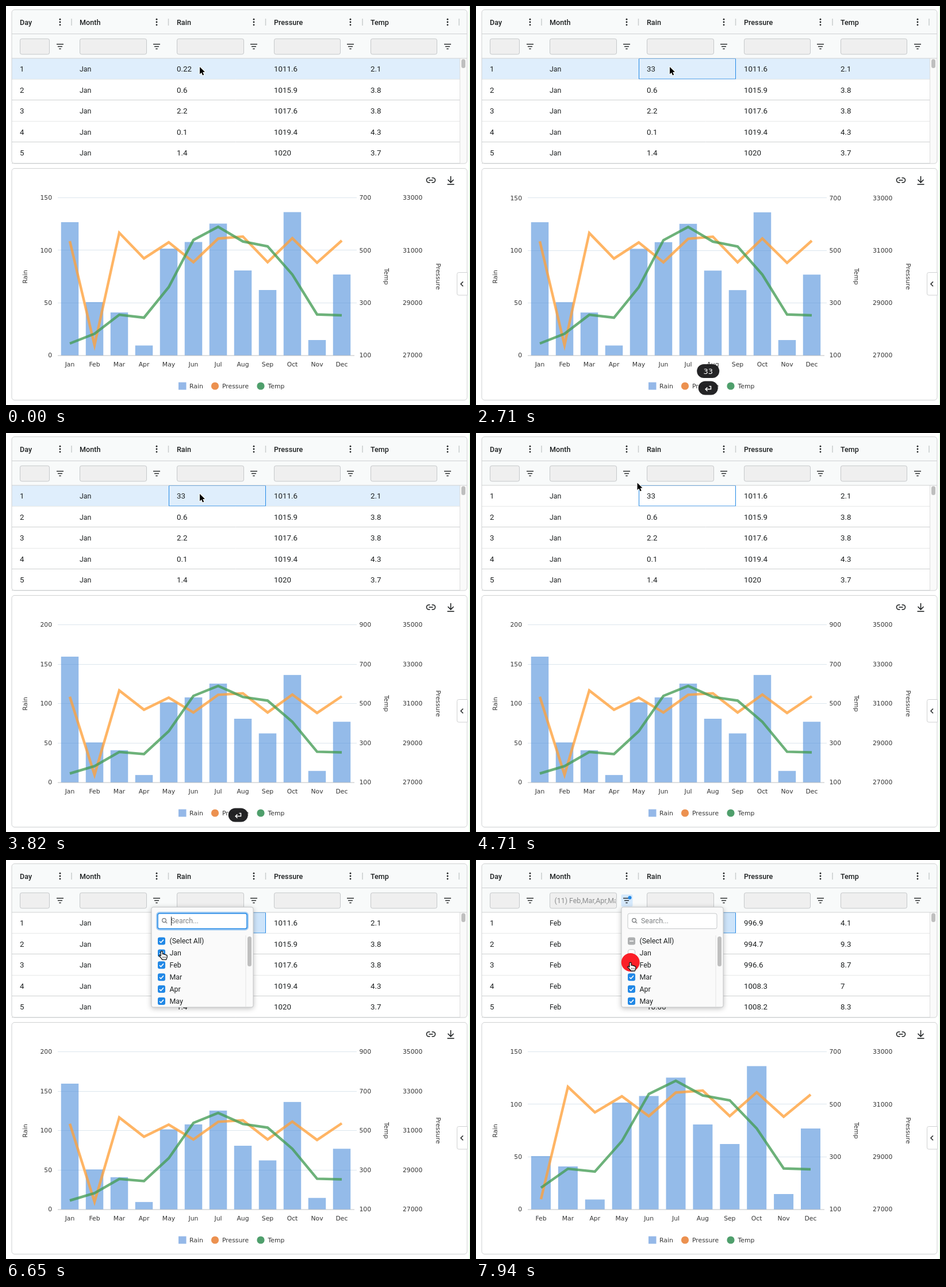
Animation, 807 px wide and 694 px high, one loop 8 s. Source, as an HTML page with a canvas:

```html
<!DOCTYPE html>
<html lang="en">
<head>
<meta charset="utf-8">
<title>Weather grid and chart</title>
<style>
  html, body { margin: 0; width: 100%; height: 100%; overflow: hidden; background: #fff; }
  canvas { display: block; }
</style>
</head>
<body>
<canvas id="stage" width="807" height="694"></canvas>
<script>
const ctx = document.getElementById('stage').getContext('2d');
const LOOP = 8000;
const BLUE = '#2188e6', INK = '#1d2021', LINE = '#cfd1d2';
const HEAD = '500 12.6px Roboto, sans-serif';
const WORD = '12.4px Roboto, sans-serif';
const DIGIT = '13.3px Roboto, sans-serif';
const AXIS = '10.8px "DejaVu Sans", sans-serif';

const T = {
  click: 290, edit: 740, key1: 1590, key2: 1820, caretOff: 2290, enter: 2710,
  keysOff: 3820, move: 4380, returnOff: 4700, arrive: 4940, filterClick: 5180, popup: 5240,
  leave: 5620, onJan: 6770, janClick: 6820, filtered: 6885, rescale: 7030, toFeb: 7290,
  onFeb: 7590, febClick: 7820
};
const CHART_MS = 500, ROWS_MS = 400, RIPPLE_MS = 440;

const MONTHS = 'Jan Feb Mar Apr May Jun Jul Aug Sep Oct Nov Dec'.split(' ');
const COLS = [['Day', 24, 52], ['Month', 128, 117], ['Rain', 297, 117], ['Pressure', 466, 116], ['Temp', 634, 116]];
const ICON_X = [94, 262, 431, 599, 768];
const ROW_H = 36.5, ROW_TOP = 91;
const JAN_ROWS = [['0.22', '1011.6', '2.1'], ['0.6', '1015.9', '3.8'], ['2.2', '1017.6', '3.8'],
  ['0.1', '1019.4', '4.3'], ['1.4', '1020', '3.7']];
const FEB_ROWS = [['0.4', '996.9', '4.1'], ['3.2', '994.7', '9.3'], ['1.8', '996.6', '8.7'],
  ['0.2', '1008.3', '7'], ['10.06', '1008.2', '8.3']];

// Heights in pixels above the base line when the Rain axis ends at 150.
const BASE = 608, PLOT_H = 274;
const RAIN = [232, 93, 75, 17.5, 186, 197.5, 229.5, 148, 114, 249.5, 27, 141];
const PRESSURE = [199, 18, 213.5, 169, 197, 162.5, 203.5, 207, 162.5, 204, 161.5, 200];
const TEMP = [21, 38, 71, 66, 119, 201, 224, 198.5, 190, 141, 71.5, 70];

const clamp = v => Math.min(1, Math.max(0, v));
const span = (t, from, ms) => clamp((t - from) / ms);
const lerp = (a, b, p) => a + (b - a) * p;
const easeOut = (u, power = 3) => 1 - Math.pow(1 - u, power);
const easeInOut = u => u * u * (3 - 2 * u);

function rect(x, y, w, h, fill, stroke, radius = 0, width = 1) {
  ctx.beginPath();
  ctx.roundRect(x, y, w, h, radius);
  if (fill) { ctx.fillStyle = fill; ctx.fill(); }
  if (stroke) { ctx.strokeStyle = stroke; ctx.lineWidth = width; ctx.stroke(); }
}

function disc(x, y, r, fill) {
  ctx.beginPath();
  ctx.arc(x, y, r, 0, Math.PI * 2);
  ctx.fillStyle = fill;
  ctx.fill();
}

function path(points, stroke, width = 1) {
  ctx.beginPath();
  points.forEach(([x, y]) => ctx.lineTo(x, y));
  ctx.strokeStyle = stroke;
  ctx.lineWidth = width;
  ctx.stroke();
}

const hline = (x1, x2, y, color, width) => path([[x1, y], [x2, y]], color, width);
const vline = (x, y1, y2, color, width) => path([[x, y1], [x, y2]], color, width);

function text(str, x, y, font, color = INK, align = 'left') {
  ctx.font = font;
  ctx.fillStyle = color;
  ctx.textAlign = align;
  ctx.fillText(str, x, y);
}

function within(x, y, w, h, draw) {
  ctx.save();
  ctx.beginPath();
  ctx.rect(x, y, w, h);
  ctx.clip();
  draw();
  ctx.restore();
}

function pose(skip, janRain, scale) {
  const step = skip ? 46.9 : 43, x0 = skip ? 113 : 111;
  const heights = list => list.slice(skip).map(h => h * scale);
  return {
    x0, step, first: skip, labelX0: x0 - step * skip, barW: skip ? 34 : 30.5, tick: PLOT_H / 3 * scale,
    rain: heights([janRain, ...RAIN.slice(1)]), pressure: heights(PRESSURE), temp: heights(TEMP)
  };
}

function mix(a, b, p) {
  const out = {};
  for (const key in b) {
    out[key] = Array.isArray(b[key]) ? b[key].map((v, i) => lerp(a[key][i], v, p)) : lerp(a[key], b[key], p);
  }
  out.first = b.first;
  return out;
}

const START = pose(0, 232, 1), EDITED = pose(0, 292, 0.75), FILTERED = pose(1, 292, 1);

function chartPose(t) {
  if (t < T.rescale) return mix(START, EDITED, easeOut(span(t, T.enter, CHART_MS)));
  return mix(EDITED, FILTERED, easeOut(span(t, T.rescale, CHART_MS)));
}

function cursorAt(t) {
  if (t < T.arrive) {
    const s = easeInOut(span(t, T.move, T.arrive - T.move));
    const curve = (a, c, b) => (1 - s) * (1 - s) * a + 2 * s * (1 - s) * c + s * s * b;
    return { x: curve(337, 277, 266), y: curve(106, 93, 73) };
  }
  const down = easeInOut(span(t, T.leave, T.onJan - T.leave));
  const next = easeInOut(span(t, T.toFeb, T.onFeb - T.toFeb));
  return { x: lerp(lerp(266, 271, down), 268.5, next), y: lerp(lerp(73, 161, down), 178, next) };
}

const overFilter = c => c.x > 252 && c.x < 273 && c.y > 60 && c.y < 81;

function drawHeader(t, cursor) {
  const active = t >= T.filtered;
  rect(10, 7, 792, 84, '#f8fafa', null, [5, 5, 0, 0]);
  hline(10, 802, 48.5, LINE);
  if (active || overFilter(cursor)) rect(252.5, 60, 20, 21, '#d5e9fc', null, 2);
  COLS.forEach(([name, x, w], i) => {
    const ix = ICON_X[i];
    text(name, x, 32.5, HEAD);
    [23.2, 28, 32.8].forEach(y => disc(ix, y, 1.4, INK));
    vline([114, 282.5, 451.5, 620, 788][i], 22, 34, '#c9cccd', 1.5);
    rect(x + .5, 57, w - 1, 27, '#efefef', '#c5c8ca', 3);
    [[6, 66.5], [4, 70.5], [1.7, 74.5]].forEach(([half, y]) => hline(ix - half, ix + half, y, INK, 1.4));
  });
  if (active) {
    within(129, 57, 114, 27, () => text('(11) Feb,Mar,Apr,May,Jun', 136.5, 74.7, WORD, '#8b8d8e'));
    disc(267.5, 65.5, 3, BLUE);
  }
}

function drawEditor(t) {
  rect(284.5, 92, 167, 34.5, '#fff', BLUE, 3, 2);
  const typed = t < T.key1 ? '0.22' : t < T.key2 ? '3' : '33';
  ctx.font = DIGIT;
  const width = ctx.measureText(typed).width;
  if (t < T.key1) rect(292, 102, width, 15, '#aed0f3');
  text(typed, 292, 114.3, DIGIT);
  if (t >= T.key1 && t < T.caretOff) vline(292.5 + width, 102, 117, INK);
}

function drawRows(t, cursor) {
  const filtered = t >= T.filtered;
  const remain = 1 - easeOut(span(t, T.filtered, ROWS_MS), 2.4);
  const focused = t >= T.click;
  within(10, 91, 779, 183, () => {
    rect(10, 91, 779, 183, '#fff');
    (filtered ? FEB_ROWS : JAN_ROWS).forEach((row, i) => {
      const rest = ROW_H * i;
      const y = ROW_TOP + rest + (filtered ? (272 - rest) * remain : 0);
      const hover = i === 0 && t < T.arrive && cursor.y > ROW_TOP;
      rect(10, y, 779, ROW_H, hover ? '#dfeefc' : '#fff');
      hline(10, 789, Math.round(y + ROW_H) - .5, LINE);
      if (i === 0 && focused) {
        rect(283.5, y + .5, 168, ROW_H - 1, t >= T.popup ? '#cde4fa' : null, BLUE);
      }
      const rain = i === 0 && !filtered && t >= T.enter ? '33' : row[0];
      const values = [i + 1, filtered ? 'Feb' : 'Jan', rain, row[1], row[2]];
      values.forEach((v, c) => text(v, COLS[c][1], y + 23, c === 1 ? WORD : DIGIT));
    });
    if (t >= T.edit && t < T.enter) drawEditor(t);
  });
  rect(789, 91, 13, 183, '#fafafa');
  vline(789.5, 91, 274, '#dedede');
  rect(792, 92.5, 7, 15.5, '#bfbfbf', null, 3.5);
  hline(10, 802, 91, LINE);
}

function drawSeries(p, heights, color) {
  path(heights.map((h, i) => [p.x0 + p.step * i, BASE - h]), color, 4.5);
}

function turnedText(str, x, y, angle) {
  ctx.save();
  ctx.translate(x, y);
  ctx.rotate(angle);
  text(str, 0, 4, AXIS, '#333', 'center');
  ctx.restore();
}

function drawChart(t) {
  const p = chartPose(t);
  const ticks = t >= T.enter + CHART_MS && t < T.rescale ? 5 : 4;
  for (let i = 0; i < ticks; i++) {
    const y = BASE - p.tick * i;
    if (i) hline(90, 610, Math.round(y) + .5 - 1, '#dce6ee');
    text(50 * i, 80, y + 3.4, AXIS, '#333', 'right');
    text(100 + 200 * i, 614.5, y + 3.4, AXIS, '#333');
    text(27000 + 2000 * i, 690, y + 3.4, AXIS, '#333');
  }
  ctx.fillStyle = 'rgba(80,144,220,.61)';
  p.rain.forEach((h, i) => {
    const shrink = i === 11 ? 1 - span(t, T.filtered, T.rescale - T.filtered) : 1;
    ctx.fillRect(p.x0 + p.step * i - p.barW / 2, BASE - h * shrink, p.barW, h * shrink);
  });
  hline(90, 606, BASE, '#bcbfc1');
  drawSeries(p, p.pressure, 'rgba(255,160,58,.78)');
  drawSeries(p, p.temp, 'rgba(69,157,85,.78)');
  MONTHS.forEach((m, i) => {
    if (i >= p.first) text(m, p.labelX0 + p.step * i, 627, AXIS, '#333', 'center');
  });
  turnedText('Rain', 33, 471, -Math.PI / 2);
  turnedText('Temp', 662, 470.5, Math.PI / 2);
  turnedText('Pressure', 752, 470.5, Math.PI / 2);

  rect(300, 654.5, 13.5, 13, '#95b8e8');
  disc(363.5, 661, 6.6, '#ec9150');
  disc(443, 661, 6.6, '#4f9f6c');
  [['Rain', 319], ['Pressure', 376], ['Temp', 455.5]].forEach(([s, x]) => text(s, x, 664.7, AXIS, '#333'));
}

function drawChartTools() {
  ctx.strokeStyle = INK;
  ctx.lineWidth = 1.6;
  [[735.5, 1], [742.5, -1]].forEach(([x, dir]) => {
    ctx.beginPath();
    ctx.moveTo(x + 2 * dir, 307);
    ctx.arc(x, 303, 4, Math.PI / 2, -Math.PI / 2, dir < 0);
    ctx.lineTo(x + 2 * dir, 299);
    ctx.stroke();
  });
  hline(735.5, 742.5, 303, INK, 1.6);
  vline(773.5, 296, 307, INK, 1.6);
  path([[768.5, 302], [773.5, 307], [778.5, 302]], INK, 1.6);
  hline(767.5, 779.5, 310.3, INK, 1.6);
  rect(784.5, 463.5, 18, 39.5, '#fff', LINE, [3, 0, 0, 3]);
  path([[795, 479.5], [791, 483.5], [795, 487.5]], INK, 1.5);
}

function drawCheckbox(y, state) {
  const fill = { on: BLUE, some: '#aeb0b1', off: '#fff' }[state];
  rect(264, y - 6.5, 13, 13, fill, null, 3);
  if (state === 'on') path([[267, y + .3], [269.4, y + 2.7], [274, y - 2.4]], '#fff', 1.6);
  if (state === 'some') hline(267, 274, y, '#fff', 1.7);
  if (state === 'off') rect(264.5, y - 6, 12, 12, null, '#c3c5c6', 3);
}

function drawPopup(t) {
  ctx.save();
  ctx.shadowColor = 'rgba(0,0,0,.28)';
  ctx.shadowBlur = 10;
  ctx.shadowOffsetY = 2;
  rect(253, 82, 177, 174, '#fafafa', null, 3);
  ctx.restore();
  rect(253, 82, 177, 174, null, '#c4c6c7', 3);

  const focus = t < T.janClick;
  if (focus) rect(263, 92, 157, 28.5, null, 'rgba(33,136,230,.4)', 4, 4);
  rect(264, 93, 155, 26.5, '#fff', focus ? BLUE : '#c5c8ca', 3, focus ? 1.5 : 1);
  ctx.beginPath();
  ctx.arc(275, 105, 3.3, 0, Math.PI * 2);
  ctx.strokeStyle = '#6d7072';
  ctx.lineWidth = 1.2;
  ctx.stroke();
  path([[277.4, 107.4], [280.2, 110.2]], '#6d7072', 1.2);
  text('Search...', 287, 110.3, WORD, '#7d8082');
  if (focus && Math.floor((t - T.popup) / 500) % 2 === 0) vline(287.5, 98.5, 114, INK);

  within(253, 131, 176, 124.5, () => {
    ['(Select All)', ...MONTHS.slice(0, 5)].forEach((label, i) => {
      const y = 141 + 20.9 * i;
      const changed = t >= T.filtered;
      drawCheckbox(y, changed && i === 0 ? 'some' : changed && i === 1 ? 'off' : 'on');
      text(label, 284.5, y + 4.4, WORD);
    });
    vline(417, 131, 256, '#e4e4e4');
    rect(420, 133, 7, 52, '#bfbfbf', null, 3.5);
  });
}

function drawBubble(y, width) {
  rect(403.7 - width / 2, y - 12, width, 24, 'rgba(28,28,30,.96)', null, 12);
}

function drawKeys(t) {
  if (t >= T.key1 && t < T.keysOff) {
    const typed = t < T.key2 ? '3' : '33';
    const y = t < T.enter ? 664.5 : 635;
    drawBubble(y, typed.length > 1 ? 39 : 34);
    text(typed, 403.7, y + 4.6, '13px "DejaVu Sans", sans-serif', '#fff', 'center');
  }
  if (t >= T.enter && t < T.returnOff) {
    drawBubble(664.5, 34);
    path([[400, 666.5], [408.5, 666.5], [408.5, 661.5], [405.5, 661.5]], '#fff', 1.5);
    path([[402.5, 663.3], [399.2, 666.5], [402.5, 669.7]], '#fff', 1.5);
  }
}

function drawRipples(t) {
  [[T.click, 337.5, 108], [T.edit, 337.5, 108], [T.filterClick, 266, 73],
   [T.janClick, 270.5, 161], [T.febClick, 268.7, 178]].forEach(([start, x, y]) => {
    const age = t - start;
    if (age >= 0 && age < RIPPLE_MS) disc(x, y, 22 * (1 - age / RIPPLE_MS), '#fb1f28');
  });
}

const ARROW = new Path2D('M0 0V12.4L2.9 9.8L5 14.5L7.2 13.5L5.1 9L8.9 8.8Z');
const HAND = new Path2D('M-1.6 1.2Q0-1 1.6 1.2V5.4Q3.6 4.2 4.3 6Q6.2 5.2 7 6.8Q9 6.4 9.4 8.4L9.2 11L7.8 15H1L-1.6 11.4L-4.8 8.4Q-4.6 6.2-2.6 7.4L-1.6 8.4Z');

function drawCursor(t, { x, y }) {
  ctx.save();
  if (t >= T.edit && t < T.enter) {
    vline(337.5, 103, 115, '#111', 1.2);
    [102.5, 115.5].forEach(end => hline(335, 340, end, '#111', 1.2));
  } else {
    const hand = overFilter({ x, y }) || (t > T.leave && y > 131);
    ctx.translate(x, y);
    ctx.lineJoin = 'round';
    ctx.strokeStyle = hand ? '#111' : '#fff';
    ctx.lineWidth = hand ? 1.3 : 2;
    ctx.fillStyle = hand ? '#fff' : '#000';
    if (hand) { ctx.fill(HAND); ctx.stroke(HAND); }
    else { ctx.stroke(ARROW); ctx.fill(ARROW); }
    if (hand) [2, 4.3, 6.6].forEach(k => vline(k, 9.5, 12.5, '#333', .8));
  }
  ctx.restore();
}

function draw(t) {
  const cursor = cursorAt(t);
  rect(0, 0, 807, 694, '#fff');
  rect(806, 0, 1, 694, '#d3f8d0');
  drawHeader(t, cursor);
  drawRows(t, cursor);
  rect(10, 6.5, 792, 267.5, null, LINE, 5);
  rect(10, 282.5, 792, 403, '#fff', LINE, 5);
  drawChart(t);
  drawChartTools();
  if (t >= T.popup) drawPopup(t);
  drawKeys(t);
  drawRipples(t);
  drawCursor(t, cursor);
}

const begin = performance.now();
function tick() {
  draw((performance.now() - begin) % LOOP);
  requestAnimationFrame(tick);
}
tick();
</script>
</body>
</html>
```
